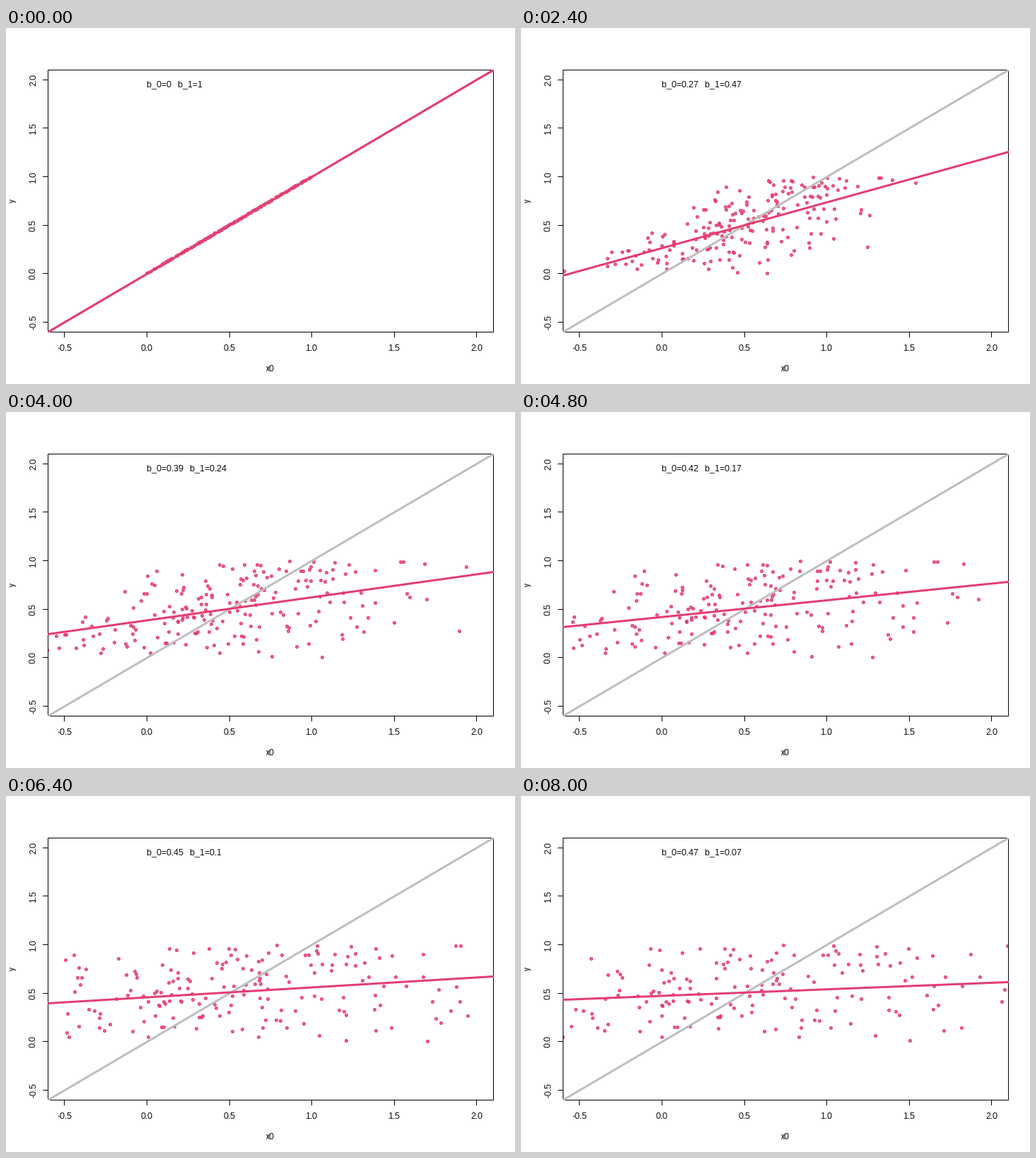
A matplotlib script for the animation above (8.8 s loop, 720 px wide and 504 px high).

```python
import math

import matplotlib.pyplot as plt
import numpy as np
from matplotlib.animation import FuncAnimation
from matplotlib.colors import to_rgba
from matplotlib.patches import Rectangle

W, H, DPI = 720, 504, 72
LEFT, TOP, RIGHT, BOTTOM = 59.04, 59.04, 688.76, 429.56
LO, HI = -0.6, 2.1
PINK, GRAY = "#E43D70", "#BEBEBE"
N, STEPS, NOISE = 200, 11, 0.1

plt.rcParams.update({
    "font.family": "Liberation Sans",
    "font.size": 12,
    "text.hinting": "native",
    "text.hinting_factor": 1,
})


def raw_draws(seed, count):
    """32-bit Mersenne Twister draws, seeded the way R's set.seed does."""
    words = []
    for _ in range(51 + 624):
        seed = (69069 * seed + 1) & 0xFFFFFFFF
        words.append(seed)
    gen = np.random.MT19937(0)
    gen.state = {
        "bit_generator": "MT19937",
        "state": {"key": np.array(words[51:], dtype=np.uint32), "pos": 624},
    }
    return gen.random_raw(count).astype(float)


def normal_quantile(p):
    """Inverse normal CDF by Newton steps from zero."""
    z = 0.0
    for _ in range(60):
        cdf = 0.5 * (1 + math.erf(z / math.sqrt(2)))
        pdf = math.exp(-z * z / 2) / math.sqrt(2 * math.pi)
        z -= (cdf - p) / pdf
    return z


draws = raw_draws(123, 3 * N)
y = draws[:N] / 2**32
coarse, fine = draws[N::2], draws[N + 1::2]
probs = (np.floor(coarse / 32) + fine / 2**32) / 2**27
noise = NOISE * np.array([normal_quantile(p) for p in probs])


def px(v):
    """Centre of the pixel column at data value v."""
    return np.rint(LEFT + (v - LO) / (HI - LO) * (RIGHT - LEFT)) + 0.5


def py(v):
    """Centre of the pixel row at data value v."""
    return np.rint(BOTTOM - (v - LO) / (HI - LO) * (BOTTOM - TOP)) + 0.5


fig = plt.figure(figsize=(W / DPI, H / DPI), dpi=DPI, facecolor="white")
ax = fig.add_axes([0, 0, 1, 1])
ax.set_xlim(0, W)
ax.set_ylim(H, 0)
ax.axis("off")


def stroke(xs, ys, color="black", lw=1, zorder=2):
    line, = ax.plot(xs, ys, color=color, lw=lw, zorder=zorder, snap=False,
                    solid_capstyle="projecting", solid_joinstyle="miter")
    return line


def label(x, ypos, text, ha="center", angle=0):
    return ax.text(x, ypos, text, ha=ha, va="baseline", rotation=angle,
                   rotation_mode="anchor", color="black", zorder=4)


# Box, ticks and titles
x0, x1, y0, y1 = px(LO), px(HI), py(LO), py(HI)
stroke([x0, x1, x1, x0, x0], [y0, y0, y1, y1, y0])
for tick in np.arange(-0.5, 2.01, 0.5):
    tx, ty = px(tick), py(tick)
    stroke([tx, tx], [y0, y0 + 7])
    stroke([x0 - 7, x0], [ty, ty])
    label(tx, 457, f"{tick:.1f}")
    label(42, ty, f"{tick:.1f}", angle=90)
label((LEFT + RIGHT) / 2, 486, "x0")
label(13, (TOP + BOTTOM) / 2, "y", angle=90)

# Data, identity line and fitted line
ends = np.array([LO, HI])
dots = ax.scatter(px(y), py(y), s=np.full(N, 16), linewidths=1,
                  facecolors=[to_rgba(PINK, 0.8)], edgecolors=PINK,
                  zorder=1, snap=False)
diagonal = stroke(px(ends), py(ends), GRAY, 3, 3)
fit = stroke(px(ends), py(ends), PINK, 3, 3.5)
clip = Rectangle((59, 59), 631, 372, transform=ax.transData)
for artist in (dots, diagonal, fit):
    artist.set_clip_path(clip)
note = label(199, 83, "", ha="left")


def update(step):
    x = y + step * noise
    slope, icept = np.polyfit(x, y, 1)
    dots.set_offsets(np.column_stack([px(x), py(y)]))
    fit.set_data(px(ends), py(icept + slope * ends))
    b0, b1 = (round(float(b), 2) + 0.0 for b in (icept, slope))
    note.set_text(f"b_0={b0:g}   b_1={b1:g}")
    return dots, fit, note


anim = FuncAnimation(fig, update, frames=STEPS, interval=800, repeat=True,
                     repeat_delay=0, blit=False)
plt.show()
```
